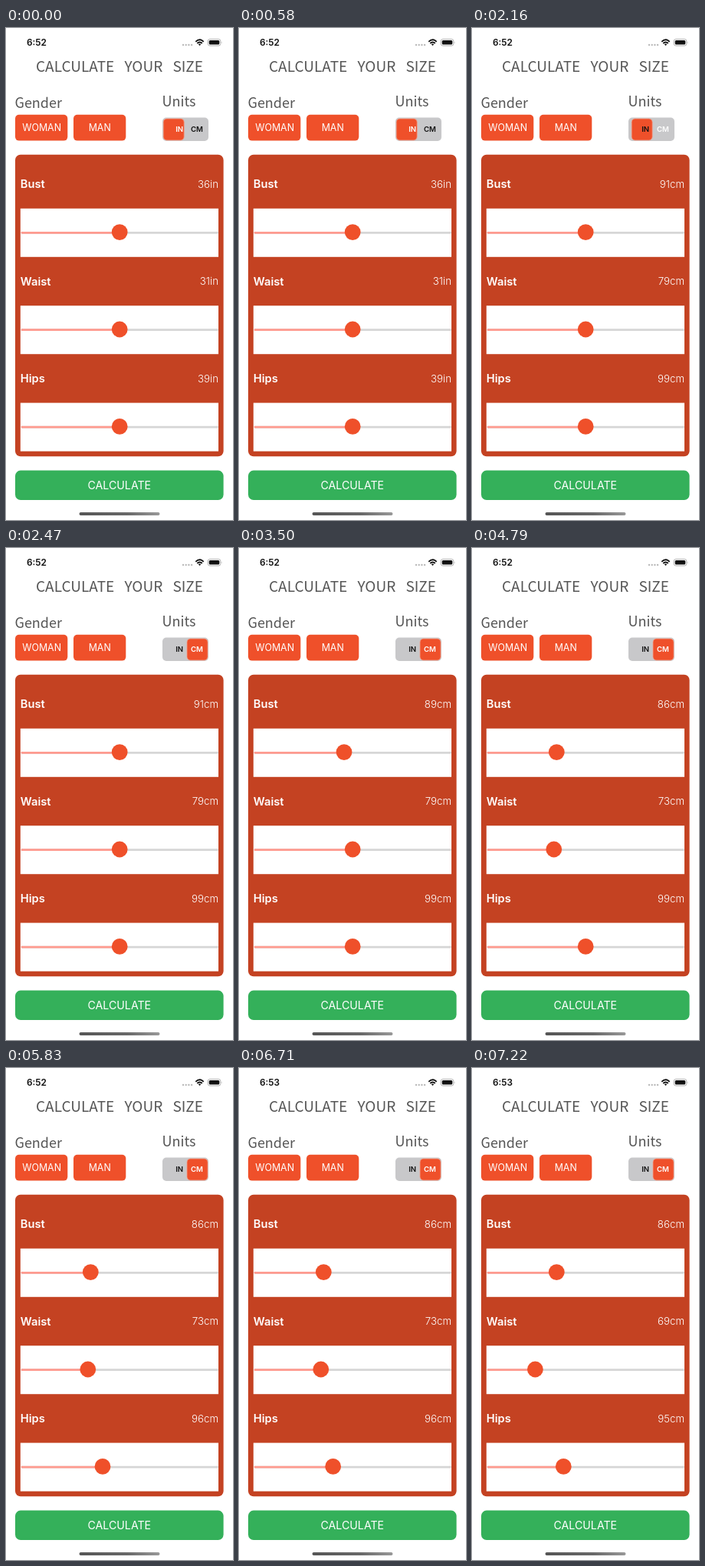
An HTML page that plays this animation: 296 px wide and 640 px high, repeating every 8000 ms.

```html
<!DOCTYPE html>
<html lang="en">
<head>
<meta charset="utf-8">
<title>Calculate your size</title>
<style>
  html, body { margin: 0; width: 100%; height: 100%; overflow: hidden; background: #fff; }
  svg { display: block; width: 100%; height: 100%; }
  text { font-family: Inter, Roboto, sans-serif; fill: #fff; }
  .head { font-family: "Noto Sans CJK JP", "Noto Sans CJK SC", "Open Sans", sans-serif; font-weight: 350; fill: #555; }
  .mid { text-anchor: middle; }
  .end { text-anchor: end; font-size: 13.3px; font-weight: 300; }
  .label { font-size: 14.7px; font-weight: 600; }
  .unit { font-size: 9.6px; font-weight: 600; }
</style>
</head>
<body>
<svg viewBox="0 0 296 640" preserveAspectRatio="none">
  <defs>
    <linearGradient id="bar"><stop offset="0" stop-color="#555"/><stop offset=".6" stop-color="#686868"/><stop offset="1" stop-color="#999"/></linearGradient>
  </defs>
  <rect width="296" height="640" fill="#fff"/>

  <text id="clock" x="40" y="23" class="mid" font-size="11.8" font-weight="600" style="fill:#111"></text>
  <g fill="#bbb"><circle cx="231" cy="22" r="1.2"/><circle cx="234.7" cy="22" r="1.2"/><circle cx="238.4" cy="22" r="1.2"/><circle cx="242.1" cy="22" r="1.2"/></g>
  <g fill="none" stroke="#111" stroke-width="1.8">
    <path d="M247.3 17.8Q252.5 12.8 257.7 17.8M249.3 20Q252.5 17 255.7 20"/>
    <path d="M250.8 21.2Q252.5 19.9 254.2 21.2L252.5 23Z" fill="#111" stroke="none"/>
  </g>
  <rect x="263.2" y="14.5" width="16.6" height="8.6" rx="2.6" fill="none" stroke="#aaa" stroke-width=".9"/>
  <rect x="264.7" y="16" width="13.6" height="5.6" rx="1.5" fill="#111"/>
  <path d="M280.8 17.4q1.5 1.4 0 2.8z" fill="#aaa"/>

  <text x="148" y="57" class="head mid" font-size="19" word-spacing="9">CALCULATE YOUR SIZE</text>
  <text x="11.5" y="104" class="head" font-size="18">Gender</text>
  <text x="203.5" y="102" class="head" font-size="18">Units</text>

  <g id="woman">
    <rect x="12" y="112.8" width="68.3" height="33.8" rx="5" fill="#ef502a"/>
    <text x="46.6" y="134.3" class="mid" font-size="12.4">WOMAN</text>
  </g>
  <rect x="88" y="112.8" width="68.3" height="33.8" rx="5" fill="#ef502a"/>
  <text x="122.2" y="134.3" class="mid" font-size="12.4">MAN</text>

  <rect x="204" y="116.5" width="60" height="30.5" rx="5" fill="#c8c8ca"/>
  <rect id="knob" y="118" width="27" height="28" rx="4.5" fill="#ef502a" stroke="#f3a08c" stroke-width=".8"/>
  <text id="inch" x="226.2" y="135.4" class="unit mid">IN</text>
  <text id="cm" x="249" y="135.4" class="unit mid">CM</text>

  <rect x="12" y="164.8" width="271.6" height="392.4" rx="7" fill="#c44222"/>
  <g id="rows"></g>

  <rect x="12" y="575.6" width="271.6" height="38.4" rx="7" fill="#34b05a"/>
  <text x="147.8" y="600" class="mid" font-size="14.2">CALCULATE</text>
  <rect x="95.5" y="630" width="105" height="4" rx="2" fill="url(#bar)"/>
</svg>
<script>
const LOOP = 8000, HOME = 148.2, PITCH = 126.4;
const $ = id => document.getElementById(id);

// Moves: [start, end, steps, target x]; pxPerCm relates thumb travel to the reading.
const sliders = [
  { name: "Bust", inch: 36, cm: 91, pxPerCm: 7.3, moves: [[3310, 3850, 8, 112], [4550, 4550, 1, 110.3]] },
  { name: "Waist", inch: 31, cm: 79, pxPerCm: 6.7, moves: [[4550, 4790, 4, 106.8], [6790, 7000, 3, 83.3], [7220, 7220, 1, 82.4]] },
  { name: "Hips", inch: 39, cm: 99, pxPerCm: 7.3, moves: [[5490, 5650, 3, 127], [5830, 5830, 1, 126], [6640, 6720, 2, 119.3]] }
];

sliders.forEach((s, i) => {
  const g = document.createElementNS("http://www.w3.org/2000/svg", "g");
  g.setAttribute("transform", `translate(0 ${i * PITCH})`);
  g.innerHTML = `
    <text x="18.8" y="208.3" class="label">${s.name}</text>
    <text x="277" y="208" class="end"></text>
    <rect x="18.8" y="234.8" width="258.2" height="63" fill="#fff"/>
    <path d="M21 266.3H275.5" stroke="#d6d6d6" stroke-width="2.8" stroke-linecap="round"/>
    <path class="fill" stroke="#ff9b90" stroke-width="2.8" stroke-linecap="round"/>
    <circle cy="265.6" r="10.4" fill="#ef502a"/>`;
  $("rows").append(g);
  s.value = g.querySelector(".end");
  s.fill = g.querySelector(".fill");
  s.thumb = g.querySelector("circle");
});

const ease = p => (1 - Math.cos(Math.PI * p)) / 2;

// The picture advances in even steps; the first step already shows movement.
function progress(t, [start, end, steps]) {
  if (t < start) return 0;
  if (t >= end) return 1;
  return ease((Math.floor((t - start) / (end - start) * (steps - 1)) + 1) / steps);
}

function render(t) {
  const metric = t >= 2160;
  $("clock").textContent = t < 6640 ? "6:52" : "6:53";
  $("woman").setAttribute("opacity", t >= 500 && t < 580 ? .5 : 1);
  $("knob").setAttribute("x", 205.2 + 30.8 * progress(t, [2160, 2470, 5]));
  $("inch").style.fill = metric ? "#111" : "#fff";
  $("cm").style.fill = metric ? "#fff" : "#111";

  for (const s of sliders) {
    const x = s.moves.reduce((pos, m) => pos + (m[3] - pos) * progress(t, m), HOME);
    s.thumb.setAttribute("cx", x);
    s.fill.setAttribute("d", `M21 266.3H${x}`);
    s.value.textContent = metric ? Math.round(s.cm - (HOME - x) / s.pxPerCm) + "cm" : s.inch + "in";
  }
}

const begin = performance.now();
function tick() {
  render((performance.now() - begin) % LOOP);
  requestAnimationFrame(tick);
}
render(0);
requestAnimationFrame(tick);
</script>
</body>
</html>
```
